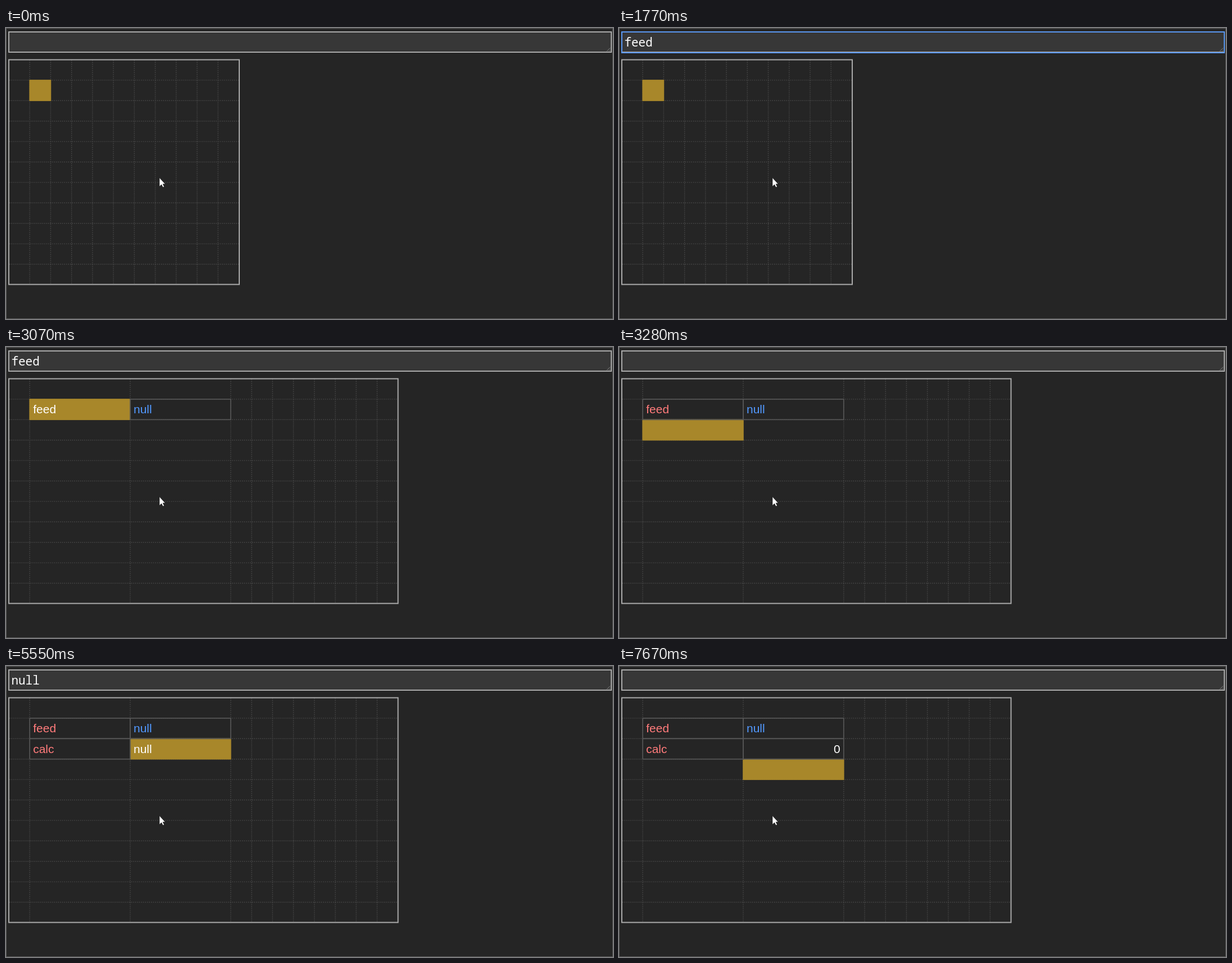
An HTML page for the animation above (8 s loop, 1080 by 518 pixels).

```html
<!DOCTYPE html>
<html lang="en">
<head>
<meta charset="utf-8">
<title>Grid editor</title>
<style>
  html, body { margin: 0; width: 100%; height: 100%; overflow: hidden; background: #252525; }
  svg { display: block; width: 1080px; height: 518px; }
  .frame { fill: none; stroke: #5c5c5c; }
  .bar { fill: #373737; stroke: #aaa; stroke-width: 2; }
  .grip { fill: none; stroke: #8a8a8a; }
  .ring { fill: none; stroke: #5a98f2; stroke-width: 2; }
  .sheet { fill: none; stroke: #aaa; stroke-width: 2; }
  .dots { fill: none; stroke: #484848; stroke-width: 1.4; stroke-dasharray: 1.6 2; }
  .cell { fill: none; stroke: #555; stroke-width: 1.7; }
  .pick { fill: #a8872a; }
  text { fill: #fff; white-space: pre; }
  .input { font: 21px "Noto Sans Mono", monospace; }
  .value { font: 21px "Liberation Sans", Arial, sans-serif; }
  .key { fill: #ff7b7b; }
  .null { fill: #5299ff; }
  .caret { fill: #fff; }
</style>
</head>
<body>
<svg viewBox="0 0 1080 518">
  <rect class="frame" x=".5" y=".5" width="1079" height="517"/>
  <rect class="bar" x="5" y="7" width="1072" height="36"/>
  <path class="grip" d="M1069 41.5l6-6M1073 41.5l2-2"/>
  <g id="bar"></g>
  <g id="sheet"></g>
  <path d="M273 266.5V282.2L276.6 278.8L279.2 283.6L281.5 282.6L279.1 277.8H283.3Z" fill="#fff" stroke="#151515" stroke-width=".6"/>
</svg>
<script>
const LOOP = 8000, TOP = 56.5, ROW = 36.4, LEFT = 42.2;
const bar = document.getElementById('bar');
const sheet = document.getElementById('sheet');

const feed = { col: 0, row: 1, text: 'feed', kind: 'key' };
const calc = { col: 0, row: 2, text: 'calc', kind: 'key' };
const none = row => ({ col: 1, row, text: 'null', kind: 'null' });
const zero = { col: 1, row: 2, text: '0', kind: 'number' };
const first = [feed, none(1)];
const second = [...first, calc, none(2)];
const done = [...first, calc, zero];

// time, input text, mode (caret, focus or idle), cells, selected column and row
const steps = [
  [0, '', 'idle', [], 0, 1],
  [870, 'f', 'caret', [], 0, 1],
  [1030, 'fe', 'caret', [], 0, 1],
  [1190, 'fee', 'caret', [], 0, 1],
  [1330, 'feed', 'caret', [], 0, 1],
  [1770, 'feed', 'focus', [], 0, 1],
  [2230, 'null', 'idle', first, 1, 1],
  [3070, 'feed', 'idle', first, 0, 1],
  [3280, '', 'idle', first, 0, 2],
  [4720, 'c', 'caret', first, 0, 2],
  [4840, 'calc', 'caret', first, 0, 2],
  [5550, 'null', 'idle', second, 1, 2],
  [5960, '=', 'caret', second, 1, 2],
  [6120, '=f', 'caret', second, 1, 2],
  [6390, '=fe', 'caret', second, 1, 2],
  [6540, '=fee', 'caret', second, 1, 2],
  [6690, '=feed', 'caret', second, 1, 2],
  [7100, '=feed*', 'caret', second, 1, 2],
  [7370, '=feed*2', 'caret', second, 1, 2],
  [7670, '', 'idle', done, 1, 3]
];

const rect = (cls, x, y, w, h) =>
  `<rect class="${cls}" x="${x}" y="${y}" width="${w}" height="${h}"/>`;

function drawBar(text, mode) {
  let out = mode === 'idle' ? '' : rect('ring', 5, 7, 1072, 37);
  out += `<text class="input" x="9.4" y="33">${text}</text>`;
  if (mode === 'caret') out += rect('caret', 9.6 + 12.6 * text.length, 11, 1.7, 28);
  bar.innerHTML = out;
}

function drawSheet(cells, col, row) {
  const wide = cells.length > 0;
  const size = wide ? 178.8 : 37.25;
  const right = wide ? 697.5 : 415;
  const colX = i => LEFT + Math.min(i, 2) * size + Math.max(i - 2, 0) * 37.22;
  const rowY = i => TOP + i * ROW;

  let lines = '';
  for (let i = 0; i < 10; i++) lines += `M${colX(i)} 57V456`;
  for (let i = 1; i < 11; i++) lines += `M6 ${rowY(i)}H${right}`;
  let out = `<path class="dots" d="${lines}"/>`;
  out += rect('pick', colX(col) - .8, rowY(row) - .8, size + 1.6, ROW + 1.6);

  for (const c of cells) {
    const x = colX(c.col), y = rowY(c.row);
    const picked = c.col === col && c.row === row;
    if (!picked) out += rect('cell', x, y, size, ROW);
    const place = c.kind === 'number' ? `x="${x + size - 6}" text-anchor="end"` : `x="${x + 6}"`;
    out += `<text class="value ${picked ? '' : c.kind}" ${place} y="${y + 25.2}">${c.text}</text>`;
  }
  sheet.innerHTML = out + rect('sheet', 5, 56.5, right - 5, 400);
}

let shown;
function tick() {
  const t = performance.now() % LOOP;
  const step = steps.findLast(s => s[0] <= t);
  if (step !== shown) {
    const [, text, mode, cells, col, row] = shown = step;
    drawBar(text, mode);
    drawSheet(cells, col, row);
  }
  requestAnimationFrame(tick);
}
tick();
</script>
</body>
</html>
```
